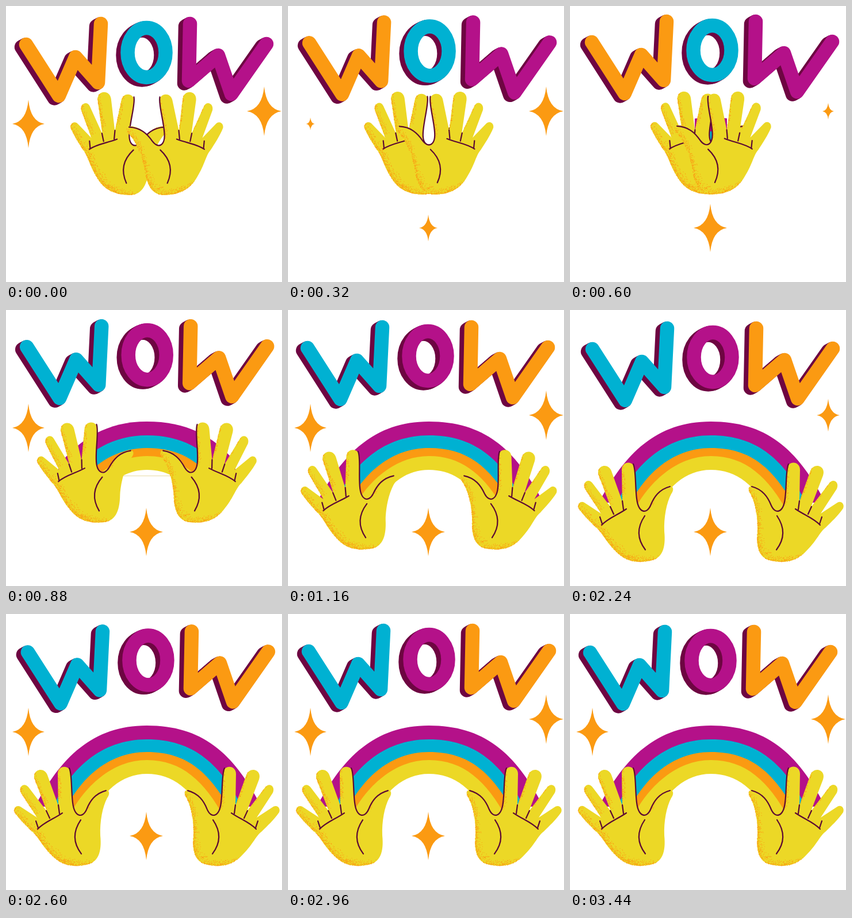
An HTML page with a canvas for the animation above (3480 ms loop, 480 px wide and 480 px high).

```html
<!DOCTYPE html>
<html lang="en">
<head>
<meta charset="utf-8">
<title>WOW rainbow hands</title>
<style>
html, body { margin: 0; width: 100%; height: 100%; overflow: hidden; background: #fff; }
canvas { display: block; }
</style>
</head>
<body>
<canvas id="stage" width="480" height="480"></canvas>
<script>
const ctx = document.getElementById('stage').getContext('2d');
const LOOP = 3480, TWINKLE = LOOP / 2, RECOLOR = 860, AXIS = 245;
const ORANGE = '#fb9a12', BLUE = '#00b1d2', PURPLE = '#b41189', YELLOW = '#ecd826';
const SHADE = '#6e0642', LINE = '#5c0a33';

// Smooth curve through rows of [time, ...values]
function follow(keys, t) {
  let i = 0;
  while (i < keys.length - 2 && t >= keys[i + 1][0]) i++;
  const a = keys[i], b = keys[i + 1];
  const before = keys[i - 1] || a, after = keys[i + 2] || b;
  const span = b[0] - a[0], u = Math.min(1, (t - a[0]) / span), v = 1 - u;
  return a.slice(1).map((_, n) => {
    const k = n + 1;
    const m0 = (b[k] - before[k]) / (b[0] - before[0]) * span;
    const m1 = (after[k] - a[k]) / (after[0] - a[0]) * span;
    return a[k] * v * v * (1 + 2 * u) + b[k] * u * u * (3 - 2 * u) + m0 * u * v * v - m1 * u * u * v;
  });
}

// time, wrist x, wrist y, rotation in degrees
const HAND_MOVE = [
  [0, 189, 325, 13], [480, 219, 324, 12.5], [600, 218, 324, 12.5], [720, 203, 325, 12],
  [840, 160, 352, 8], [960, 116, 402, 3], [1080, 104, 424, 0], [1160, 118, 416, 3],
  [1320, 115, 437, 0], [1600, 115, 437, 0], [2240, 115, 438, 0], [3440, 115, 438, 0]
];
// time, x, y
const WORD_MOVE = [
  [0, 0, 0], [600, 3, -4], [1160, -1, -1], [1600, -1, 0],
  [2240, 4, 1], [2960, 1, -2], [3440, 0, 0]
];

const hand = new Path2D(
  'M15 345C12 338 18 331 25 335L54 354L26 311C21 300 32 292 39 301L71 343L50 288' +
  'C44 271 66 264 72 280L91 333L90 278C90 262 112 261 113 278L116 328' +
  'C119 353 133 356 140 340C146 325 155 312 168 307C180 303 182 312 176 320' +
  'C168 335 163 360 164 385C167 415 160 432 140 436C115 441 95 437 78 418' +
  'C60 400 55 385 45 378C35 368 24 358 15 345Z');
const creases = new Path2D(
  'M110 268C115 278 113 305 116 328C119 353 133 356 140 340C146 325 155 312 174 307' +
  'M55 374C66 362 82 357 98 346M52 360L56 372M70 342L76 355M91 332L93 347' +
  'M130 358C115 380 118 400 131 417');

// Grain hugs the lower edge on the side given by dir
function makeGrain(dir) {
  const grain = new Path2D();
  let seed = 7;
  const rand = () => (seed = seed * 16807 % 2147483647) / 2147483647;
  for (let i = 0; i < 24000; i++) {
    const x = 10 + 175 * rand(), y = 255 + 186 * rand();
    const d = (3 + 12 * (y - 250) / 190) * rand() ** 2;
    if (ctx.isPointInPath(hand, x, y) && !ctx.isPointInPath(hand, x - dir * d, y + d * .8))
      grain.rect(x - .5, y - .5, 1, 1);
  }
  return grain;
}
const grains = { left: makeGrain(1), right: makeGrain(-1) };

const letters = [
  new Path2D('M35 67L92 156L121 89L160 133L165 31'),
  new Path2D('M211.500 81a33 43 0 1 1 66 0a33 43 0 1 1 -66 0Z'),
  new Path2D('M320 31L318 130L369 86L392 153L453 66')
];

const bands = [
  [PURPLE, 'M50 335C95 250 150 194 245 194S395 240 444 335Z'],
  [BLUE, 'M78 345C108 270 165 218 245 218S375 260 415 345Z'],
  [ORANGE, 'M98 350C125 290 175 240 245 240S355 275 395 350Z'],
  [YELLOW, 'M108 355C135 300 185 254 245 254S345 290 380 355Z'],
  ['#fff', 'M145 360C165 310 200 278 245 278S325 305 348 360Z']
].map(([color, d]) => [color, new Path2D(d)]);

// x, y, half width, half height, time the shrink begins
const stars = [[39, 205, 28, 42, 100], [449, 183, 30, 43, 400], [244, 386, 29, 42, 1400]];
const starShape = new Path2D('M0 -1Q.12 -.1 1 0Q.12 .1 0 1Q-.12 .1 -1 0Q-.12 -.1 0 -1Z');

function drawWord(t) {
  const [x, y] = follow(WORD_MOVE, t);
  const colors = t < RECOLOR ? [ORANGE, BLUE, PURPLE] : [BLUE, PURPLE, ORANGE];
  ctx.lineWidth = 24.5;
  letters.forEach((letter, i) => {
    for (let depth = 8; depth >= 0; depth--) {
      ctx.save();
      ctx.translate(x - depth, y + depth * .55);
      ctx.strokeStyle = depth ? SHADE : colors[i];
      ctx.stroke(letter);
      ctx.restore();
    }
  });
}

function drawStar([x, y, w, h, start], t) {
  const age = (t - start + TWINKLE) % TWINKLE;
  const s = age < 300 ? 1 - age / 300 : Math.max(0, Math.min(1, (age - 550) / 200));
  if (!s) return;
  ctx.save();
  ctx.translate(x, y);
  ctx.scale(w * s, h * s);
  ctx.fillStyle = ORANGE;
  ctx.fill(starShape);
  ctx.restore();
}

// The hands uncover the rainbow as they part
function drawRainbow(t, [wristX, wristY]) {
  if (t < 560) return;
  const half = 1.7 * (AXIS - wristX) - 18;
  ctx.save();
  ctx.beginPath();
  ctx.rect(AXIS - half, 180, 2 * half, wristY - 260);
  ctx.clip();
  for (const [color, band] of bands) {
    ctx.fillStyle = color;
    ctx.fill(band);
  }
  ctx.restore();
}

function drawHand([x, y, degrees], side) {
  ctx.save();
  if (side === 'right') {
    ctx.translate(2 * AXIS, 0);
    ctx.scale(-1, 1);
  }
  ctx.translate(x, y);
  ctx.rotate(degrees * Math.PI / 180);
  ctx.translate(-115, -438);
  ctx.fillStyle = YELLOW;
  ctx.fill(hand);
  ctx.fillStyle = ORANGE;
  ctx.fill(grains[side]);
  ctx.strokeStyle = LINE;
  ctx.lineWidth = 2.2;
  ctx.stroke(creases);
  ctx.restore();
}

function draw(now) {
  const t = now % LOOP;
  const pose = follow(HAND_MOVE, t);
  ctx.fillStyle = '#fff';
  ctx.fillRect(0, 0, 480, 480);
  drawWord(t);
  drawRainbow(t, pose);
  drawHand(pose, 'left');
  drawHand(pose, 'right');
  stars.forEach(star => drawStar(star, t));
}

ctx.lineCap = ctx.lineJoin = 'round';
const begin = performance.now();
function tick() {
  draw(performance.now() - begin);
  requestAnimationFrame(tick);
}
tick();
</script>
</body>
</html>
```
